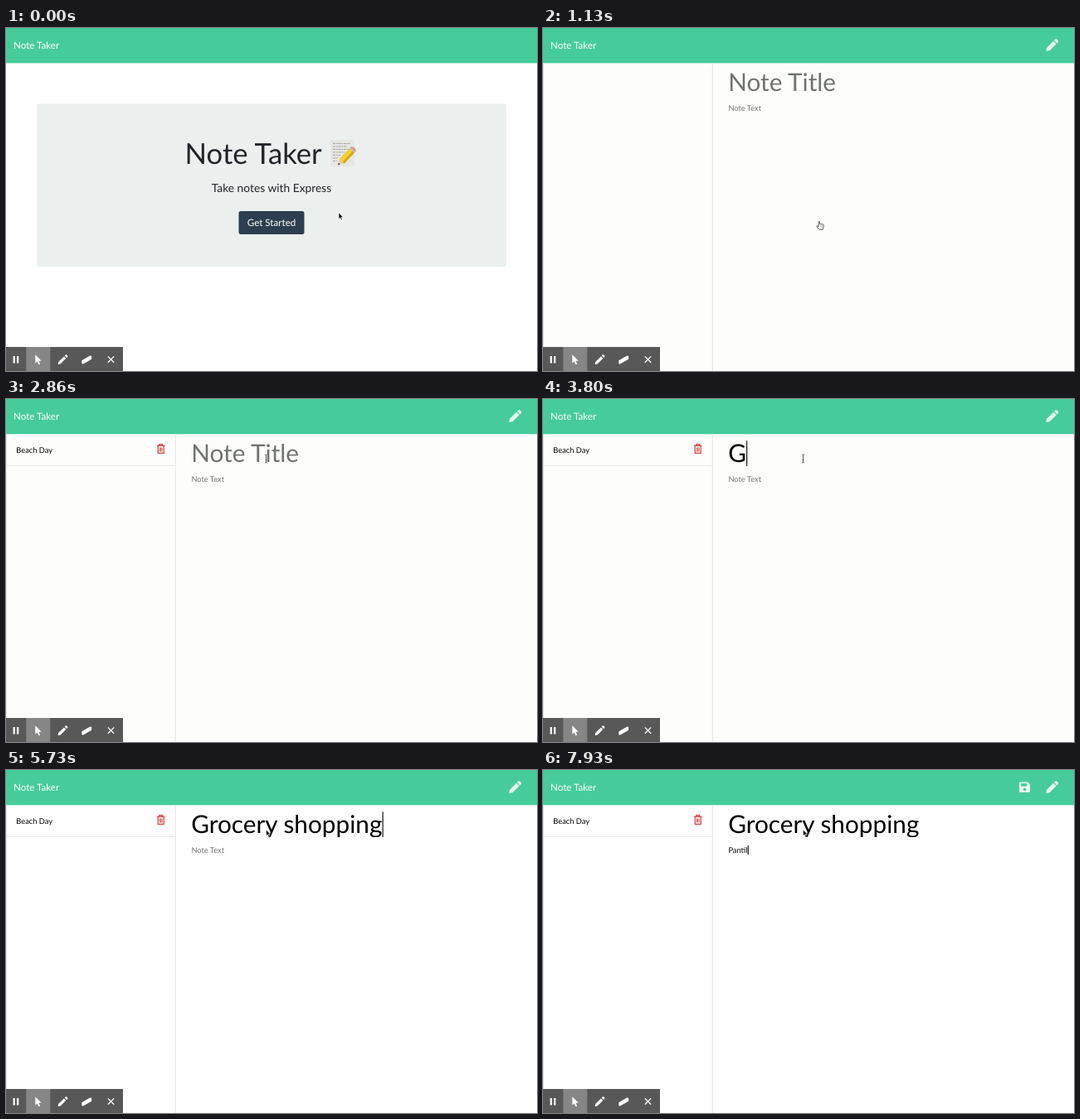
An HTML page that plays this animation: 640 px wide and 414 px high, repeating every 8 s.

```html
<!DOCTYPE html>
<html lang="en">
<head>
<meta charset="utf-8">
<title>Note Taker</title>
<style>
html, body { margin: 0; width: 100%; height: 100%; overflow: hidden; background: #fefefe; }
svg { display: block; width: 640px; height: 414px; }
text { font-family: Lato, "Open Sans", sans-serif; font-size: 9.3px; white-space: pre; text-rendering: geometricPrecision; }
.brand, .label { font-size: 11.6px; fill: #fff; }
.hero { font-size: 34.7px; fill: #212529; }
.lead { font-size: 13.8px; fill: #212529; }
.mid { text-anchor: middle; }
.title { font-size: 29.76px; }
.line { fill: none; stroke: #e2e5e4; }
.bar { fill: #46cc9a; }
</style>
</head>
<body>
<svg viewBox="0 0 640 414" xmlns="http://www.w3.org/2000/svg">
  <defs>
    <clipPath id="titleBox"><rect x="215" y="48" width="425" height="33"/></clipPath>
  </defs>
  <rect id="page" width="640" height="414" fill="#fefefe"/>
  <rect class="bar" width="640" height="42.4"/>
  <text class="brand" x="9" y="25.4">Note Taker</text>

  <g id="home">
    <rect id="panel" x="37" y="91.5" width="566" height="196.5" rx="3" fill="#ebf0ee"/>
    <text class="hero" x="215.6" y="163.6">Note Taker</text>
    <g id="memo">
      <rect x="391" y="135" width="29" height="32.5" rx="1" fill="#e6e7e4"/>
      <path d="M394 139.5h21M394 143h17M394 146.5h20M394 150h14M394 153.5h9M394 157h6M394 160.5h5" stroke="#a2a5a3" stroke-width="1.1" stroke-dasharray="3.2 .8 1.8 .7" fill="none"/>
      <path d="M400 165.5l2.2-7.5 5.5 5.2z" fill="#e9c99a"/>
      <path d="M400 165.5l.8-2.7 2 1.8z" fill="#444"/>
      <path d="M402 157.8L414 145.2l6 5.2-12.2 13z" fill="#f2d02c"/>
      <path d="M405.8 161.4l12.2-12.8 2 1.8-12.2 13z" fill="#d7a51c"/>
      <path d="M414 145.2l1.5-1.5 6 5.2-1.5 1.5z" fill="#b4bcc0"/>
      <path d="M415.5 143.7c2-2 7.8 2.6 6 5.2z" fill="#e58a80"/>
    </g>
    <text class="lead mid" x="320" y="198">Take notes with Express</text>
    <rect id="ring" x="279.5" y="220" width="81" height="30" rx="3.5" fill="none" stroke="#aab2b5" stroke-width="2"/>
    <rect id="button" x="280.5" y="221" width="79" height="28" rx="2.8"/>
    <text class="label mid" x="320" y="239">Get Started</text>
  </g>

  <g id="notes">
    <path class="line" d="M.5 42.4V414M204.3 42.4V414"/>
    <g id="item">
      <path class="line" d="M0 80.3H204"/>
      <text x="12.3" y="65">Beach Day</text>
      <g fill="none" stroke="#d5403f" stroke-width="1.2">
        <path d="M182 56.4h9.4M184.8 56v-1.4h3.8V56M183.2 56.8v8.6h7v-8.6"/>
        <path d="M185.3 58.5v5M186.7 58.5v5M188.1 58.5v5" stroke-width=".9"/>
      </g>
    </g>
    <text id="title" class="title" x="223.2" y="76" clip-path="url(#titleBox)"></text>
    <text id="body" x="223.4" y="100"></text>
    <rect id="caret" width="1.1"/>
    <g id="save">
      <path d="M575.3 14.5h8.7l3 3v8.4q0 1.2-1.2 1.2h-10.5q-1.2 0-1.2-1.2v-10.2q0-1.2 1.2-1.2z" fill="#eef9f4"/>
      <rect x="575.8" y="16.2" width="7.4" height="3.5" fill="#46cc9a"/>
      <circle cx="580.5" cy="23.4" r="1.8" fill="#46cc9a"/>
    </g>
    <path d="M606.3 28l.9-4.3 8-8 3.5 3.5-8 8zM616 14.9l1.3-1.3q1-.9 2 0l1.5 1.5q.9 1 0 2l-1.3 1.3z" fill="#e6f7f0"/>
  </g>

  <g id="tools">
    <rect y="385" width="141" height="29" fill="#585858"/>
    <rect x="24.3" y="385" width="29" height="29" fill="#868686"/>
    <g fill="#fff">
      <path d="M8.6 396h2.3v8.4H8.6zM13 396h2.3v8.4H13z"/>
      <path d="M35.3 394.3v10.2l2.4-2.1 1.7 3.8 1.7-.8-1.7-3.7h3.3z"/>
      <path d="M62.6 406l.6-2.9 6.7-6.7 2.4 2.4-6.7 6.7zM70.7 395.6l1-1q.8-.6 1.5 0l.9.9q.6.8 0 1.5l-1 1z"/>
      <path d="M91.3 401.2l9.6-5.4q2-.8 2.2.8v3.1l-9.6 5.6q-2 .8-2.2-.8z"/>
    </g>
    <path d="M122.8 396.4l7.4 7.4M130.2 396.4l-7.4 7.4" stroke="#fff" stroke-width="1.3"/>
  </g>

  <g id="arrow"><path d="M0 0v7.4l1.7-1.5 1.1 2.6 1.3-.6-1.1-2.5h2.3z" fill="#111" stroke="#fff" stroke-width=".5"/></g>
  <g id="hand"><path d="M-.9 3.8V.8Q-.2-.3.5.8v2.6l4 .7q.9.2.8 1.2L4.6 8.8l-.4 1.5H-.1L-3 6.8q-.6-1.2.6-1l1.5 1z" fill="#fff" stroke="#333" stroke-width=".8"/><path d="M1.6 4.8v2M3.2 5v2" stroke="#555" stroke-width=".5"/></g>
  <g id="beam"><path d="M-1.6-5.2q1.6 0 1.6 1.2v8q0 1.2-1.6 1.2M1.6-5.2Q0-5.2 0-4v8q0 1.2 1.6 1.2M-1 1.6h2" fill="none" stroke="#fff" stroke-width="1.8"/><path d="M-1.6-5.2q1.6 0 1.6 1.2v8q0 1.2-1.6 1.2M1.6-5.2Q0-5.2 0-4v8q0 1.2 1.6 1.2M-1 1.6h2" fill="none" stroke="#555" stroke-width=".8"/></g>
</svg>
<script>
const LOOP = 8000, FPS = 15;
const el = Object.fromEntries([...document.querySelectorAll("[id]")].map(e => [e.id, e]));
const show = (e, on) => e.setAttribute("visibility", on ? "visible" : "hidden");

// Key presses in ms, one per character
const TITLE = { text: "Grocery shopping", hint: "Note Title",
  keys: [3790, 4000, 4130, 4260, 4390, 4530, 4660, 4790, 4930, 5000, 5130, 5260, 5330, 5460, 5530, 5660] };
const BODY = { text: "Pantil", hint: "Note Text",
  keys: [6930, 7130, 7390, 7590, 7730, 7860] };

// Pointer path: time, x, y
const PATH = [[0, 401, 223], [60, 401, 223], [300, 360, 229], [530, 333, 233], [1590, 333, 233],
  [1900, 337, 170], [2200, 333, 92], [2400, 330, 77], [2460, 330, 77], [2600, 313.5, 72], [LOOP, 313.5, 72]];

const BLINK = 469, CLICK = 2390, TAB = 6190;

function pointer(t) {
  const i = PATH.findIndex(p => p[0] > t);
  const [t0, x0, y0] = PATH[i - 1], [t1, x1, y1] = PATH[i];
  const k = (t - t0) / (t1 - t0), s = k * k * (3 - 2 * k);
  return [x0 + (x1 - x0) * s, y0 + (y1 - y0) * s];
}

function type(node, field, t) {
  const n = field.keys.filter(k => k <= t).length;
  node.textContent = n ? field.text.slice(0, n) : field.hint;
  node.setAttribute("fill", n ? "#000" : "#70736f");
  return n;
}

function placeCaret(t, counts) {
  const inBody = t >= TAB;
  const [node, field, n] = inBody ? [el.body, BODY, counts[1]] : [el.title, TITLE, counts[0]];
  const since = n ? field.keys[n - 1] : inBody ? TAB : CLICK;
  show(el.caret, t >= CLICK && Math.floor((t - since) / BLINK) % 2 === 0);
  const x = +node.getAttribute("x") + (n ? node.getComputedTextLength() : 0);
  el.caret.setAttribute("x", x + 0.2);
  el.caret.setAttribute("y", inBody ? 91 : 50.5);
  el.caret.setAttribute("height", inBody ? 11 : 30.5);
}

function render(ms) {
  const t = Math.floor((ms + 7) * FPS / 1000) * 1000 / FPS;
  const home = t < 1130, warm = t >= 730 && t < 4000;
  el.home.style.display = home ? "" : "none";
  el.notes.style.display = home ? "none" : "";
  el.page.setAttribute("fill", warm ? "#fdfefc" : "#fefefe");
  el.panel.setAttribute("fill", warm ? "#eceeed" : "#ebf0ee");

  const [x, y] = pointer(t);
  const over = home && x < 359.5;
  const dark = over ? Math.min(1, (t - 300) / 150) : 0;
  const mix = (a, b) => Math.round(a + (b - a) * dark);
  el.button.setAttribute("fill", `rgb(${mix(44, 24)},${mix(62, 36)},${mix(80, 46)})`);
  show(el.ring, home && t >= 930);

  const shape = t >= 4000 ? "arrow" : t >= 1600 ? "beam" : over || !home ? "hand" : "arrow";
  for (const id of ["arrow", "hand", "beam"]) {
    show(el[id], id === shape);
    el[id].setAttribute("transform", `translate(${x} ${y})`);
  }

  if (home) {
    el.save.style.display = "none";
    show(el.caret, false);
  } else {
    el.item.style.display = t >= 1190 ? "" : "none";
    const counts = [type(el.title, TITLE, t), type(el.body, BODY, t)];
    el.save.style.display = t >= BODY.keys[0] + 60 ? "" : "none";
    placeCaret(t, counts);
  }
}

const start = performance.now();
function loop() {
  render((performance.now() - start) % LOOP);
  requestAnimationFrame(loop);
}
loop();
</script>
</body>
</html>
```
